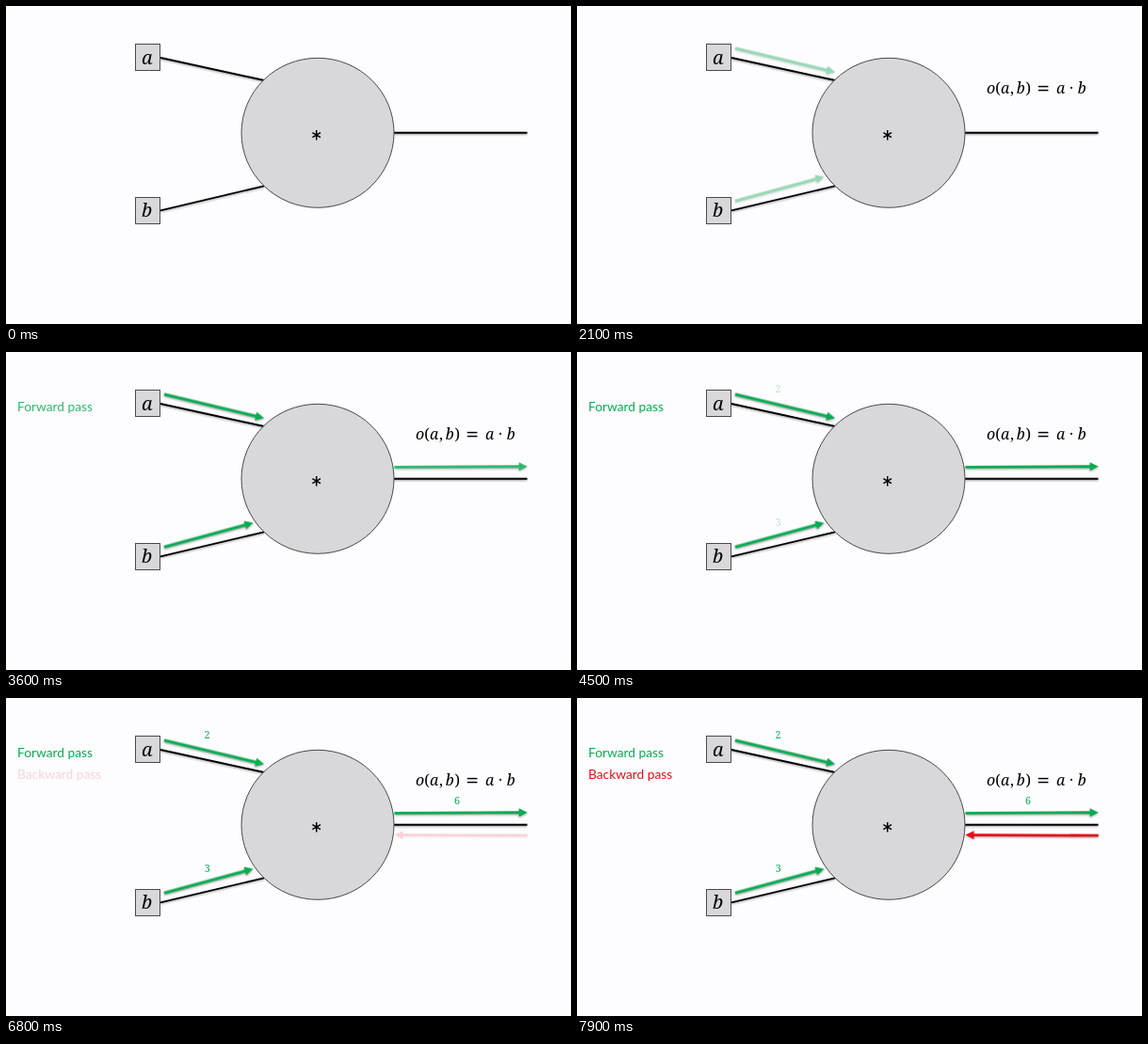
These frames come from a looping animation (600 px wide and 338 px high, 8 s). An HTML page:

```html
<!DOCTYPE html>
<html lang="en">
<head>
<meta charset="utf-8">
<title>Multiplication node</title>
<style>
  html, body { margin: 0; width: 100%; height: 100%; overflow: hidden; background: #fdfcfe; }
  svg { display: block; width: 100vw; height: 100vh; }
  text { font-family: "Noto Serif", "Liberation Serif", serif; text-anchor: middle; }
  .var { font-style: italic; font-size: 20px; }
  .formula { font-size: 16px; }
  .formula .i { font-style: italic; }
  .formula .op { font-family: "DejaVu Sans", sans-serif; font-size: 17px; }
  .num { font-size: 10.8px; }
  .label { font: 13.75px Lato, "Open Sans", sans-serif; text-anchor: start; }
  .shape { fill: #d8d7d9; stroke: #4a4a4a; }
  .wire { stroke: #000; stroke-width: 1.9; }
  .shadow { filter: drop-shadow(0 1px .8px rgba(0, 0, 0, .38)); }
  .green { fill: #06ac50; stroke: #06ac50; }
  .red { fill: #e80c18; stroke: #e80c18; }
  text.green, text.red { stroke: none; }
</style>
</head>
<body>
<svg viewBox="0 0 600 338">
  <g class="shadow wire">
    <path d="M164 55 274 79M164 217.3 274 191.3M412 134.8H553.5"/>
  </g>
  <g class="shape">
    <rect x="137.5" y="40.5" width="26" height="28"/>
    <rect x="137.5" y="203.5" width="26" height="28"/>
    <ellipse cx="331" cy="134.8" rx="81" ry="79.5"/>
  </g>
  <text class="var" x="149.7" y="62">a</text>
  <text class="var" x="149.7" y="224.3">b</text>
  <path stroke="#000" stroke-width="1.5" d="M329.7 132V142.4M325.4 134.7 334 139.7M334 134.7 325.4 139.7"/>

  <g id="formula" class="formula">
    <text class="i" x="439.7" y="93">o</text>
    <text x="447" y="93">(</text>
    <text class="i" x="454.6" y="93">a</text>
    <text x="462" y="93">,</text>
    <text class="i" x="471.2" y="93">b</text>
    <text x="479.2" y="93">)</text>
    <text class="op" x="495" y="93">=</text>
    <text class="i" x="513.6" y="93">a</text>
    <text x="525" y="93">·</text>
    <text class="i" x="536.3" y="93">b</text>
  </g>
  <g id="inputs" class="shadow green"></g>
  <g id="forward">
    <text class="label green" x="12" y="63.3">Forward pass</text>
    <g id="output" class="shadow green"></g>
  </g>
  <g id="values">
    <text class="num green" x="213.4" y="43.3">2</text>
    <text class="num green" x="213.8" y="185">3</text>
  </g>
  <text id="product" class="num green" x="479" y="113.2">6</text>
  <g id="backward">
    <text class="label red" x="12" y="85.8">Backward pass</text>
    <g id="gradient" class="shadow red"></g>
  </g>
</svg>
<script>
  const LOOP = 8000, STEP = 100;
  const $ = id => document.getElementById(id);

  function arrow(parent, x1, y1, x2, y2) {
    const length = Math.hypot(x2 - x1, y2 - y1);
    const angle = Math.atan2(y2 - y1, x2 - x1) * 180 / Math.PI;
    $(parent).insertAdjacentHTML("beforeend",
      `<g transform="translate(${x1} ${y1}) rotate(${angle})">
        <path stroke-width="2.8" d="M0 0H${length - 7}"/>
        <path stroke="none" d="M${length} 0l-9 -4.4v8.8z"/>
      </g>`);
  }

  arrow("inputs", 168, 45, 274, 70.3);
  arrow("inputs", 168, 207.3, 262.5, 181.6);
  arrow("output", 412.5, 122.4, 553.7, 121.7);
  arrow("gradient", 553.7, 146.2, 412.5, 145.5);

  // id, start time in ms, number of fade steps
  const fades = [
    ["formula", 800, 5],
    ["inputs", 1900, 7],
    ["forward", 3200, 6],
    ["values", 4400, 7],
    ["product", 5600, 6],
    ["backward", 6800, 6]
  ].map(([id, start, steps]) => ({ node: $(id), start, steps }));

  function draw(now) {
    const t = now % LOOP;
    for (const { node, start, steps } of fades) {
      const step = Math.floor((t - start) / STEP) + 1;
      node.style.opacity = Math.min(1, Math.max(0, step / steps));
    }
    requestAnimationFrame(draw);
  }
  draw(0);
</script>
</body>
</html>
```
